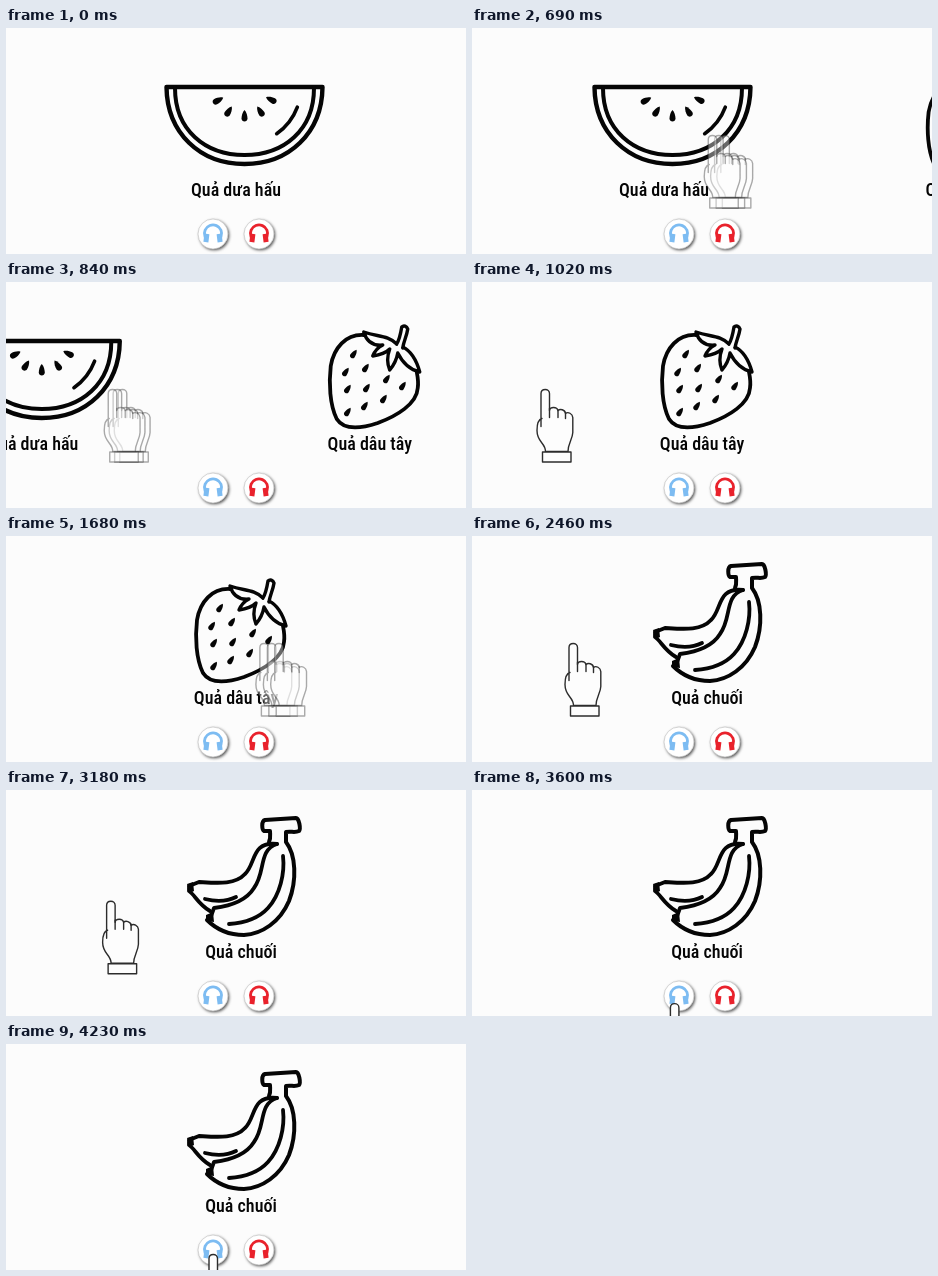
An HTML page with a canvas for the animation above (4410 ms loop, 460 px wide and 226 px high).

```html
<!DOCTYPE html>
<html lang="vi">
<head>
<meta charset="utf-8">
<title>Trái cây</title>
<style>
  html, body { margin: 0; width: 100%; height: 100%; overflow: hidden; background: #fcfcfc; }
  canvas { display: block; }
</style>
</head>
<body>
<canvas id="stage" width="460" height="226"></canvas>
<script>
const ctx = document.getElementById('stage').getContext('2d');
const LOOP = 4410;
const INK = '#050505';
const path = d => new Path2D(d);

const HAND = path('M5 38V5C5 -.4 13.5 -.4 13.5 5V22C14 18 21 18 22 22C24 20 29 21 29.5 25' +
  'C32 23 36.5 25 36.8 29V44C36.5 51 32 55 32 63H9.5C9.5 54 1 54 1 42C1 35 2 31 6 30');
const CREASES = path('M13.5 20V29M22 22V29M29.5 24V30');

const MELON_RIND = path('M160.5 59H316.5C316 105 283 136 238.500 136C194 136 161 105 160.5 59Z');
const MELON_FLESH = path('M169 60C169 102 199 127 238.500 127C278 127 308 102 308 60');

const BERRY = path('M224 53C206 52 194 66 191 84C189 101 190 123 197 137C204 148 220 147 238 141' +
  'C257 134 277 122 278 106C279 100 278 95 277 90');
const LEAVES = path('M257 62C248 53 238 55 224 50C227 60 234 64 243 63C237 66 235 69 233 74' +
  'C240 73 246 71 250 67C247 75 247 81 250 88C255 82 257 77 258 71C264 83 271 88 280 90' +
  'C277 79 271 69 263 65');
const BERRY_STEM = path('M257 62C260 57 261 51 262 45C264 43 267 44 268 47C267 54 264 59 263 66');
const BERRY_SEEDS = [[214, 72], [206, 90], [226, 86], [208, 107], [227, 106],
  [247, 97], [208, 130], [225, 124], [244, 117], [263, 104]];

const BANANA_CAP = path('M259 30L290 28C293 28 295 39 293 41C289 43 285 41 280 42' +
  'L280 52C290 65 291 90 283 111C274 132 256 144 238 145C223 145 210 139 201 130' +
  'M263 52C265 48 264 45 264 41L258 41C256 40 255 31 259 30');
const BANANA_BACK = path('M271 54C245 51 250 74 239 84C229 95 211 93 193 92L183 96L183 101' +
  'C189 105 192 114 204 121M199 109C211 112 222 111 230 107');
const BANANA_FRONT = path('M271 54C252 60 260 82 248 98C240 111 224 116 208 118L204 129' +
  'M277 66C279 83 274 105 262 118C252 129 238 133 223 134');
const BANANA_TIPS = path('M181 94L187 92L188 101L184 103ZM200 125L207 122L208 132L200 131Z');

const clamp = v => Math.min(1, Math.max(0, v));
const mix = (a, b, p) => a + (b - a) * p;
function ease(t, start, end) {
  const p = clamp((t - start) / (end - start));
  return p * p * (3 - 2 * p);
}

function line(shape, width, fill) {
  if (fill) { ctx.fillStyle = fill; ctx.fill(shape); }
  ctx.lineWidth = width;
  ctx.strokeStyle = INK;
  ctx.stroke(shape);
}

function dot(x, y, r) {
  ctx.beginPath();
  ctx.arc(x, y, r, 0, 7);
  ctx.fill();
}

// Teardrop with its narrow end up before rotation
function seed(x, y, angle, size) {
  ctx.save();
  ctx.translate(x, y);
  ctx.rotate(angle);
  ctx.scale(size, size);
  ctx.fillStyle = INK;
  ctx.beginPath();
  ctx.moveTo(0, -6);
  ctx.bezierCurveTo(2, -4, 3, 0, 3, 2.5);
  ctx.bezierCurveTo(3, 6.5, -3, 6.5, -3, 2.5);
  ctx.bezierCurveTo(-3, 0, -2, -4, 0, -6);
  ctx.fill();
  ctx.restore();
}

const setFont = size => {
  ctx.font = `500 condensed ${size}px "Roboto Condensed", Roboto, sans-serif`;
};

function label(text, x) {
  setFont(18);
  if (ctx.measureText('Quả dưa hấu').width > 95) setFont(16);
  ctx.textAlign = 'center';
  ctx.fillStyle = INK;
  ctx.fillText(text, x, 168);
}

function melon() {
  line(MELON_RIND, 4.4);
  line(MELON_FLESH, 4);
  for (const a of [2.66, 2.13, Math.PI / 2, 1.01, 0.46]) {
    seed(238.5 + 30 * Math.cos(a), 59 + 29 * Math.sin(a), a - Math.PI / 2, 1);
  }
  ctx.lineWidth = 3.6;
  ctx.beginPath();
  ctx.arc(238, 59, 57, 0.36, 0.96);
  ctx.stroke();
  dot(293, 72.500, 2);
  label('Quả dưa hấu', 230);
}

function berry() {
  line(BERRY, 3.8);
  line(LEAVES, 3.4, '#fcfcfc');
  line(BERRY_STEM, 3.4, '#fcfcfc');
  for (const [x, y] of BERRY_SEEDS) seed(x, y, 0.6, 0.85);
  label('Quả dâu tây', 230);
}

function banana() {
  line(BANANA_CAP, 4);
  line(BANANA_BACK, 3.8);
  line(BANANA_FRONT, 3.8);
  ctx.fillStyle = INK;
  ctx.fill(BANANA_TIPS);
  label('Quả chuối', 235);
}

function card(draw, dx) {
  if (Math.abs(dx) >= 320) return;
  ctx.save();
  ctx.translate(dx, 0);
  draw();
  ctx.restore();
}

function button(x, color) {
  const y = 206;
  ctx.save();
  ctx.shadowColor = 'rgba(0,0,0,.65)';
  ctx.shadowBlur = 3;
  ctx.shadowOffsetX = ctx.shadowOffsetY = 1.3;
  ctx.fillStyle = '#fff';
  dot(x, y, 15);
  ctx.restore();
  ctx.strokeStyle = '#c4c4c4';
  ctx.lineWidth = 0.7;
  ctx.beginPath();
  ctx.arc(x, y, 15, 0, 7);
  ctx.stroke();
  ctx.strokeStyle = ctx.fillStyle = color;
  ctx.lineWidth = 2.8;
  ctx.beginPath();
  ctx.arc(x, y - 0.5, 8.6, Math.PI * 0.88, Math.PI * 2.12);
  ctx.stroke();
  for (const side of [-1, 1]) {
    ctx.save();
    ctx.translate(x + side * 6.6, y + 4);
    ctx.rotate(side * -0.12);
    ctx.fillRect(-2.5, -4.2, 5, 8.4);
    ctx.restore();
  }
}

// Each move: start time, end time, x and y reached
const MOVES = [
  [30, 370, 315, 106], [540, 930, 64, 106], [1440, 1815, 346, 106], [1980, 2370, 92, 106],
  [3120, 3670, 198, 217], [3670, 3930, 198, 201], [3930, 4230, 198, 209]
];

function handAt(t) {
  let x = 243, y = 227;
  for (const [start, end, toX, toY] of MOVES) {
    const p = ease(t, start, end);
    x = mix(x, toX, p);
    y = mix(y, toY, p);
  }
  return [x, y];
}

function drawHand([x, y], alpha) {
  ctx.save();
  ctx.globalAlpha = alpha;
  ctx.translate(x, y + 0.5);
  ctx.strokeStyle = '#2c2c2c';
  ctx.fillStyle = '#fdfdfd';
  ctx.lineWidth = 1.4;
  ctx.fill(HAND);
  ctx.stroke(HAND);
  ctx.stroke(CREASES);
  ctx.fillRect(6.500, 63.500, 28.500, 10);
  ctx.strokeRect(6.500, 63.500, 28.500, 10);
  ctx.restore();
}

function hand(t) {
  const now = handAt(t);
  const before = handAt(Math.max(0, t - 14));
  const blurred = Math.hypot(now[0] - before[0], now[1] - before[1]) > 5;
  if (!blurred) return drawHand(now, 1);
  for (let i = 2; i >= 0; i--) drawHand(handAt(t - i * 7), 0.4);
}

function render(t) {
  ctx.fillStyle = '#fcfcfc';
  ctx.fillRect(0, 0, 460, 226);
  ctx.lineCap = ctx.lineJoin = 'round';
  card(melon, -320 * ease(t, 605, 1005));
  card(berry, t < 1500 ? mix(272, 0, ease(t, 658, 1020)) : -320 * ease(t, 2045, 2445));
  card(banana, mix(282, 0, ease(t, 2098, 2460)));
  button(207, '#7dbcf2');
  button(253, '#e9222c');
  hand(t);
}

const origin = performance.now();
function tick() {
  render((performance.now() - origin) % LOOP);
  requestAnimationFrame(tick);
}
tick();
</script>
</body>
</html>
```
